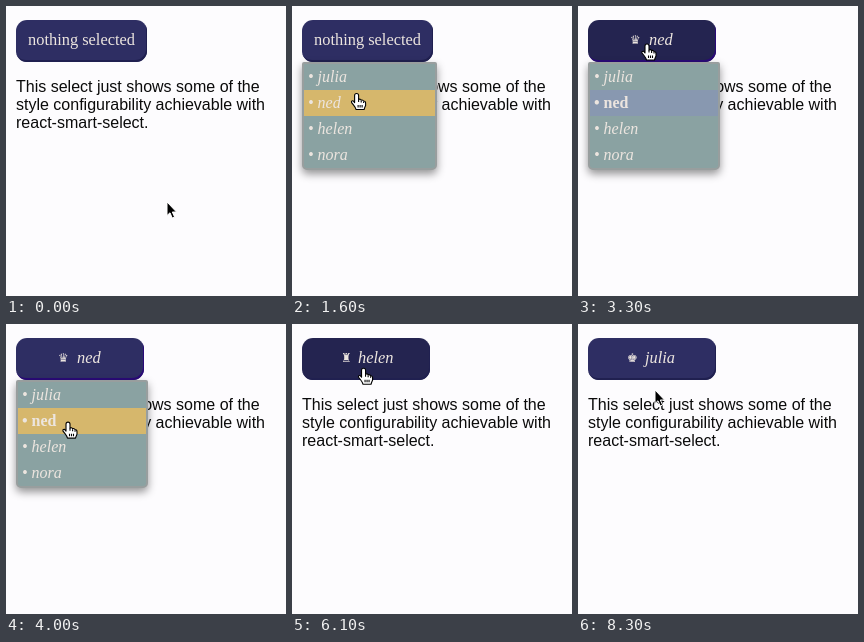
An HTML page for the animation above (8.6 s loop, 280 px wide and 290 px high).

```html
<!DOCTYPE html>
<html lang="en">
<head>
<meta charset="utf-8">
<title>Styled select</title>
<style>
  html, body { margin: 0; width: 100%; height: 100%; overflow: hidden; background: #fdfcfe; }
  body { position: relative; }
  p, #button, #menu, #button span, svg { position: absolute; margin: 0; white-space: nowrap; }
  p { left: 10px; top: 72px; font: 16px/18px "Liberation Sans", Arial, sans-serif; color: #0b0b0b; }
  #button, #menu { left: 10px; color: #ece5df; box-sizing: border-box; }
  #button {
    --edge: #202050;
    top: 14px; height: 42px; border-radius: 11px; background: #2e2e63;
    box-shadow: inset -1px -2px var(--edge);
    font: 16.4px/40px "Liberation Serif", Times, serif;
  }
  #button.open { --edge: #2a0a78; }
  #button.hover { background: #242450; }
  #button.empty { --edge: #202050; }
  #icon { font: 12px/40px "DejaVu Sans", sans-serif; }
  #menu {
    top: 56px; height: 108px; border: 2px solid #989e9e; border-radius: 2px 2px 5px 5px;
    background: #8aa2a2; box-shadow: 0 4px 9px rgba(0, 0, 0, .42);
    font: italic 16px/26px "Liberation Serif", Times, serif;
  }
  #menu div { height: 26px; padding-left: 4px; }
  #menu .picked { background: #8898b0; font-style: normal; font-weight: bold; }
  #menu .hover { background: #d6b76c; }
  svg { left: 0; top: 0; }
</style>
</head>
<body>
<p>This select just shows some of the<br>style configurability achievable with<br>react-smart-select.</p>
<div id="button"><span id="icon"></span><span id="label"></span></div>
<div id="menu"></div>
<svg width="280" height="290">
  <g id="pointer" stroke-linejoin="round">
    <circle id="ring" r="31" fill="none" stroke="#222" stroke-width="1.5"/>
    <path id="arrow" fill="#000" stroke="#fff" d="M0 0V13.5L3 10.8L5.2 16L7.6 15L5.3 10H9.5Z"/>
    <path id="beam" fill="none" stroke="#222" stroke-width="1.2"
      d="M-3-8Q0-8 0-6V6Q0 8-3 8M3-8Q0-8 0-6M0 6Q0 8 3 8M-2 3H2"/>
    <g id="hand" stroke="#000" stroke-width="1.1">
      <path fill="#fff" d="M-2 1Q-2-1 0-1T2 1V5Q4 4 4.5 5.5Q6.5 5 7 6.5Q9 6.5 9 8.5V11Q8 13 7.5 15H-.5Q-1 13-3 10.5L-5 8Q-5.5 6-3.5 6.2L-2 8Z"/>
      <path fill="none" d="M2 5V7.5M4.6 6V8M7 7V8.5M1.5 10.5V13M3.5 10.5V13M5.5 10.5V13"/>
    </g>
  </g>
</svg>
<script>
const LOOP = 8600, STEP = 100;
const $ = id => document.getElementById(id);

const options = [
  { name: "julia", icon: "♚", iconX: 39, textX: 57 },
  { name: "ned", icon: "♛", iconX: 42, textX: 61 },
  { name: "helen", icon: "♜", iconX: 39, textX: 56 },
  { name: "nora" },
];

// Pointer stops: time, x, y
const stops = [
  [0, 161, 196], [700, 76, 32], [900, 75, 29], [1000, 75, 30], [1700, 64, 92],
  [2200, 64, 92], [2800, 69, 38], [3300, 69, 39], [4400, 59, 125],
  [5700, 59, 125], [6200, 73, 36], [6700, 74, 36], [7000, 77, 67],
  [7500, 77, 66], [LOOP, 77, 66],
];

// Every press opens the menu or picks an option
const presses = [
  { at: 700 }, { at: 1800, pick: 1 }, { at: 2900 },
  { at: 4900, pick: 2 }, { at: 6300 }, { at: 7400, pick: 0 },
];

const rows = options.map(({ name }) => {
  const row = document.createElement("div");
  row.textContent = "• " + name;
  return $("menu").appendChild(row);
});

function pointerAt(t) {
  const next = stops.findIndex(s => s[0] > t);
  const [t0, x0, y0] = stops[next - 1], [t1, x1, y1] = stops[next];
  const u = (t - t0) / (t1 - t0), k = u * u * (3 - 2 * u);
  return [x0 + (x1 - x0) * k, y0 + (y1 - y0) * k];
}

const show = (id, on) => $(id).style.display = on ? "" : "none";

function draw(t) {
  const [x, y] = pointerAt(t);
  const done = presses.filter(p => t >= p.at + STEP);
  const open = done.length % 2 === 1;
  const picks = done.filter(p => "pick" in p);
  const picked = picks.length ? picks[picks.length - 1].pick : -1;
  const empty = picked < 0;
  const width = empty ? 131 : 128;

  const onButton = x >= 10 && x < 10 + width && y >= 14 && y < 56;
  const onMenu = open && x >= 12 && x < 12 + width && y >= 58 && y < 162;
  const onText = !onMenu && y >= 72 && y < 126 && x >= 10 && x < 270;

  $("button").style.width = width + "px";
  $("button").classList.toggle("open", open);
  $("button").classList.toggle("hover", onButton);
  $("button").classList.toggle("empty", empty);

  const { name, icon, iconX, textX } = empty
    ? { name: "nothing selected", icon: "", iconX: 0, textX: 12 } : options[picked];
  $("icon").textContent = icon;
  $("icon").style.left = iconX + "px";
  $("label").textContent = name;
  $("label").style.left = textX + "px";
  $("label").style.fontStyle = empty ? "normal" : "italic";

  show("menu", open);
  $("menu").style.width = width + 4 + "px";
  rows.forEach((row, i) => {
    row.classList.toggle("picked", i === picked);
    row.classList.toggle("hover", onMenu && Math.floor((y - 58) / 26) === i);
  });

  $("pointer").setAttribute("transform", `translate(${x} ${y})`);
  show("ring", presses.some(p => t >= p.at && t < p.at + 2 * STEP));
  show("hand", onButton || onMenu);
  show("beam", onText);
  show("arrow", !onButton && !onMenu && !onText);
}

function tick() {
  draw(Math.floor(performance.now() % LOOP / STEP) * STEP);
  requestAnimationFrame(tick);
}
tick();
</script>
</body>
</html>
```
